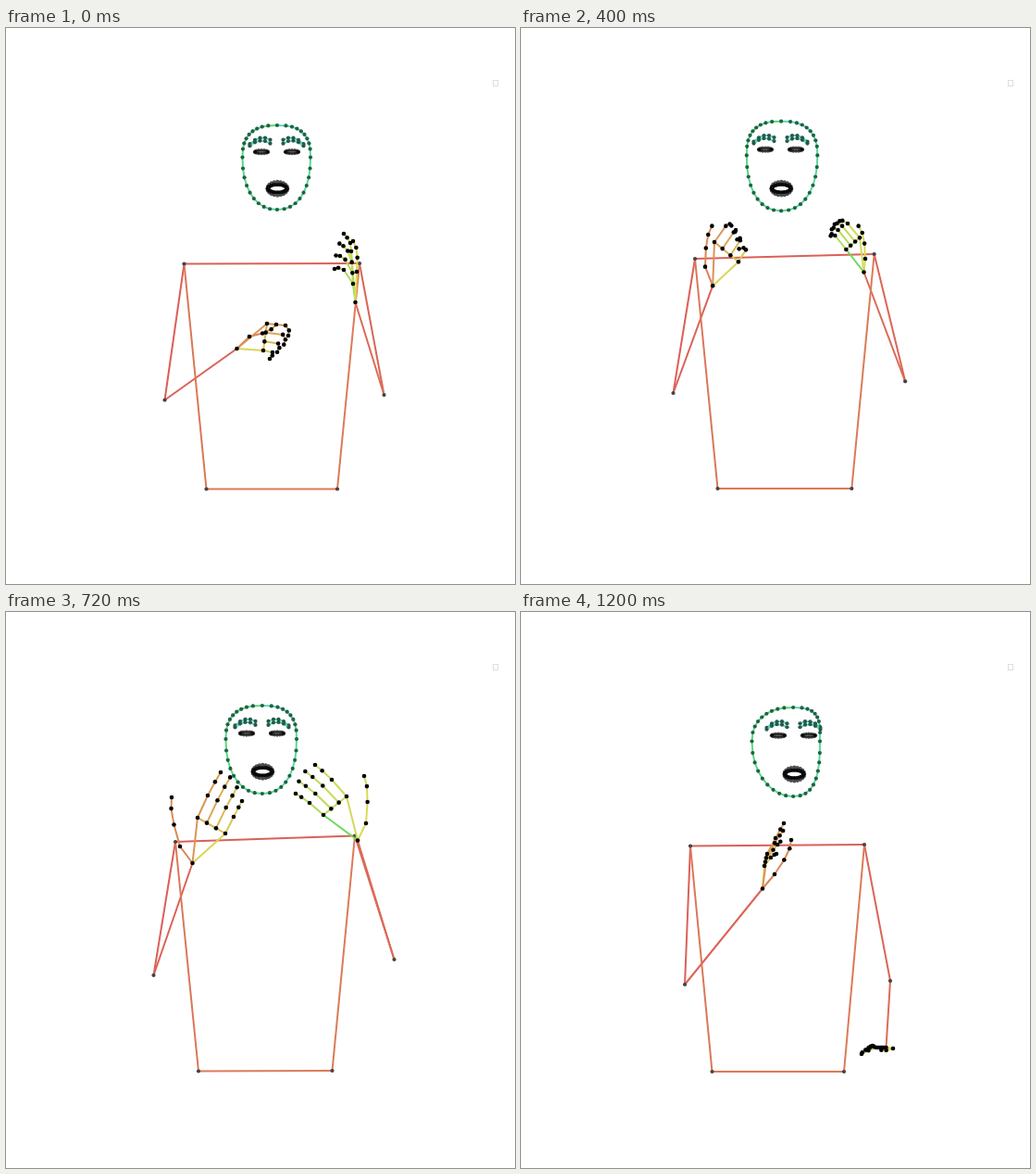
These frames come from a looping animation (550 by 600 pixels, 1.28 s). An HTML page with a canvas:

```html
<!DOCTYPE html>
<html lang="en">
<head>
<meta charset="utf-8">
<title>Pose skeleton</title>
<style>
html, body { margin: 0; width: 100%; height: 100%; overflow: hidden; background: #fff; }
canvas { display: block; }
</style>
</head>
<body>
<canvas id="stage" width="550" height="600"></canvas>
<script>
const ctx = document.getElementById('stage').getContext('2d');
const LOOP = 1280, STEP = 80, TAU = Math.PI * 2;
const poses = [];

// body: shoulders, elbows, hips (left, right)
// hands: wrist, thumb base and tip, then knuckle, joint and tip of the index and of the little finger
// face: left, right, top, bottom, chin x
function pose(time, body, handA, handB, face) {
  poses.push({ time, body, handA, handB, face });
}

pose(0,
  [192.5,254.5, 382,254, 171.5,401.5, 408.5,396, 216.5,497.5, 358,497.5],
  [249.5,346, 263,333, 292,320, 282,319, 302,321, 305,332, 278,348, 288,350, 285,357],
  [377.5,296, 379,263, 375,230, 373,241, 372,232, 365,222, 375,276, 365,261, 355,260],
  [255.5,329, 105,196, 293]);
pose(160,
  [188,248, 385,243.5, 163.5,398, 416.5,384.5, 213,498.5, 360,498.5],
  [214,292, 201,270, 204,218, 224,240, 237,219, 243,210, 255,266, 262,253, 252,251],
  [370.5,254.5, 377,235, 371,182, 366,201, 354,177, 342,160, 341,221, 328,205, 321,195],
  [246,323, 98,197, 284]);
pose(320,
  [189,247, 385.5,241, 161.5,393, 418.5,378, 213.5,498, 360.5,498],
  [199,267, 190,247, 197,206, 196,219, 207,203, 211,210, 223,239, 229,228, 217,233],
  [362,255, 361,244, 349,216, 355,222, 341,209, 333,212, 345,230, 333,214, 330,220],
  [243,321, 98,197, 280]);
pose(560,
  [186,253, 374,250, 170.5,396, 408.5,388, 210.5,495, 351,495],
  [223.5,300.5, 217,279, 225,229, 235,255, 250,235, 260,220, 259,279, 271,262, 273,249],
  [387.5,280.5, 394,259, 396,209, 388,235, 377,215, 367,201, 364,257, 352,244, 344,233],
  [245.5,319, 106,198, 283]);
pose(720,
  [183,248, 377,241.5, 159.5,392, 419.5,375, 208,495.5, 352.5,495],
  [201.5,271, 188,253, 179,200, 207,222, 218,198, 232,173, 237,239, 246,221, 255,204],
  [380,246.5, 389,228, 387,177, 368,199, 352,181, 334,165, 343,219, 328,206, 313,196],
  [237.5,314, 101,196, 277]);
pose(880,
  [175,250, 368,247, 160,394, 417,386.5, 200,498, 345,497.5],
  [216,264, 212,250, 217,202, 215,216, 222,192, 233,172, 232,223, 238,203, 245,183],
  [385,282, 391,273, 385,241, 381,250, 372,241, 366,250, 365,254, 360,244, 362,246],
  [236,312, 98.5,195, 278]);
pose(1200,
  [183,252.5, 371,251, 177,402, 399,398, 206.5,496, 349,496],
  [261,298.5, 274,283, 292,246, 266,261, 275,244, 284,228, 263,274, 270,265, 276,261],
  [394.5,470, 402,471, 386,470, 388,470, 380,468, 377,470, 393,470, 384,470, 368,477],
  [249.5,323, 103,199, 295]);

const hue = h => `hsl(${h} 65% 60%)`;
const mix = (a, b, k) => a.map((v, i) => v + (b[i] - v) * k);
const add = (a, b, k) => a.map((v, i) => v + b[i] * k);
const sub = (a, b) => add(a, b, -1);
const pairs = list => Array.from({ length: list.length / 2 }, (_, i) => [list[2 * i], list[2 * i + 1]]);

function line(a, b, color, width = 2) {
  ctx.strokeStyle = color;
  ctx.lineWidth = width;
  ctx.beginPath();
  ctx.moveTo(...a);
  ctx.lineTo(...b);
  ctx.stroke();
}

function dots(points, color, r = 2.2) {
  ctx.fillStyle = color;
  for (const [x, y] of points) {
    ctx.beginPath();
    ctx.arc(x, y, r, 0, TAU);
    ctx.fill();
  }
}

function chain(points, from, to) {
  for (let i = 1; i < points.length; i++) {
    line(points[i - 1], points[i], hue(from + (to - from) * i / points.length));
  }
}

function ring(cx, cy, rx, ry, count) {
  return Array.from({ length: count }, (_, i) => {
    const a = i / count * TAU;
    return [cx + rx * Math.cos(a), cy + ry * Math.sin(a)];
  });
}

function drawBody(list, wristA, wristB) {
  const p = pairs(list);
  const [sa, sb, ea, eb, ha, hb] = p;
  line(sa, sb, hue(4));
  line(sa, ea, hue(4));
  line(ea, wristA, hue(5));
  line(sb, eb, hue(7));
  line(eb, wristB, hue(9));
  line(sa, ha, hue(14));
  line(sb, hb, hue(16));
  line(ha, hb, hue(16));
  dots(p, '#444', 2.1);
}

// The thumb bows away from the index knuckle
function thumb(base, tip, knuckle) {
  const [dx, dy] = sub(tip, base), [kx, ky] = sub(knuckle, base);
  const side = Math.sign(dx * ky - dy * kx) || 1;
  const normal = [side * dy, -side * dx];
  const bow = 2.5 / Math.hypot(dx, dy);
  return [base, add(mix(base, tip, .45), normal, bow), add(mix(base, tip, .78), normal, bow), tip];
}

// Fingers fan out evenly from index (0) to little finger (1); the inner two are longer
function finger(index, little, k) {
  const [knuckle, joint, tip] = index.map((p, i) => mix(p, little[i], k));
  const reach = 1 + .5 * k * (1 - k);
  const bend = add(knuckle, sub(joint, knuckle), reach);
  const end = add(knuckle, sub(tip, knuckle), reach);
  return [knuckle, bend, add(mix(bend, end, .47), sub(bend, knuckle), .12), end];
}

function drawHand(p, from, to, edge) {
  const wrist = p[0], index = p.slice(3, 6), little = p.slice(6, 9);
  const digits = [thumb(p[1], p[2], p[3])];
  for (let i = 0; i < 4; i++) digits.push(finger(index, little, i / 3));
  line(wrist, little[0], hue(edge));
  digits.forEach((d, i) => {
    const h = from + (to - from) * i / 5;
    line(i < 2 ? wrist : digits[i - 1][0], d[0], hue(h));
    chain(d, h, h + (to - from) / 5);
  });
  dots([wrist, ...digits.flat()], '#000', 2.3);
}

// Egg-shaped outline made of two superellipse halves, leaning towards the chin
function outline([left, right, top, bottom, chinX]) {
  const mid = (left + right) / 2, half = (right - left) / 2, tall = bottom - top;
  return Array.from({ length: 37 }, (_, i) => {
    const a = i / 36 * TAU, s = Math.sin(a), c = Math.cos(a);
    const n = c > 0 ? 2.6 : 2.25;
    const u = Math.sign(s) * Math.abs(s) ** (2 / n);
    const w = Math.sign(c) * Math.abs(c) ** (2 / n);
    const y = top + tall * (.38 - w * (c > 0 ? .38 : .62));
    return [mid + half * u + (chinX - mid) * w * w * .9, y];
  });
}

function drawBrow(x, y, s) {
  for (let row = 0; row < 2; row++) {
    const p = Array.from({ length: 5 }, (_, i) => {
      const k = i / 4;
      return [x + s * (22 * k - 12.5), y - 8.5 + 2 * row - 17 * k * (1 - k) - 4.5 * k + 2 * row * k];
    });
    chain(p, 155, 172);
    dots(p, '#28584c', 2.1);
  }
}

function drawEye(x, y) {
  ctx.fillStyle = '#666';
  ctx.beginPath();
  ctx.ellipse(x, y, 7.5, 2.2, 0, 0, TAU);
  ctx.fill();
  dots(ring(x, y, 7.5, 2, 16), 'rgba(0,0,0,.68)', 1.7);
}

function drawMouth(x, y) {
  dots(ring(x, y, 11, 7.4, 20), 'rgba(20,20,24,.75)', 2);
  dots(ring(x, y, 10.2, 4.2, 24), '#0a0a0c', 2.1);
}

function drawFace(f) {
  const [, , top, bottom, chinX] = f, tall = bottom - top;
  const p = outline(f);
  chain(p, 158, 130);
  dots(p.slice(1), '#23604a', 2.1);
  for (const s of [1, -1]) {
    const x = chinX - .5 - s * 16.5, y = top + tall * .315;
    drawBrow(x, y, s);
    drawEye(x, y);
  }
  drawMouth(chinX + .3, top + tall * .75);
}

function poseAt(t) {
  const i = poses.findIndex(p => p.time > t) - 1;
  if (i < 0) return poses[poses.length - 1];
  const a = poses[i], b = poses[i + 1];
  let k = (t - a.time) / (b.time - a.time);
  if (i === poses.length - 2) k = 1 - (1 - k) ** 2.2;
  const out = {};
  for (const key of ['body', 'handA', 'handB', 'face']) out[key] = mix(a[key], b[key], k);
  return out;
}

function draw(t) {
  ctx.fillStyle = '#fff';
  ctx.fillRect(0, 0, 550, 600);
  ctx.lineCap = 'round';
  ctx.strokeStyle = '#dedede';
  ctx.lineWidth = 1;
  ctx.strokeRect(526.5, 56.5, 5, 6);

  const now = poseAt(t);
  const a = pairs(now.handA), b = pairs(now.handB);
  drawBody(now.body, a[0], b[0]);
  drawFace(now.face);
  drawHand(a, 20, 56, 57);
  drawHand(b, 60, 84, 112);
}

const start = performance.now();
function tick() {
  const t = (performance.now() - start) % LOOP;
  draw(Math.floor(t / STEP) * STEP);
  requestAnimationFrame(tick);
}
tick();
</script>
</body>
</html>
```
